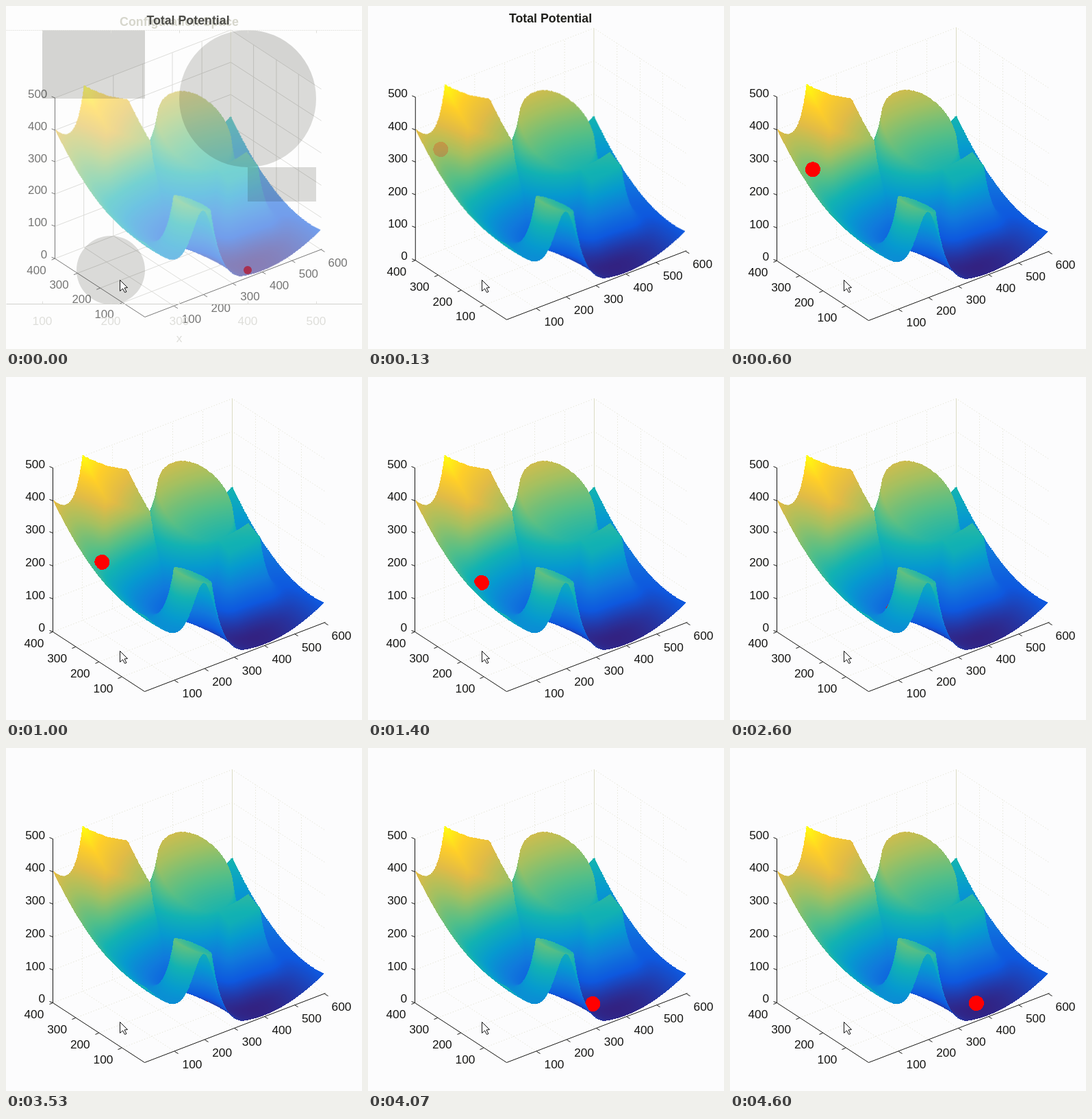
An HTML page with a canvas that plays this animation: 520x500 px, repeating every 4670 ms.

```html
<!DOCTYPE html>
<html lang="en">
<head>
<meta charset="utf-8">
<title>Total Potential</title>
<style>
  html, body { margin: 0; width: 100%; height: 100%; overflow: hidden; background: #fcfcfd; }
  canvas { display: block; }
</style>
</head>
<body>
<canvas id="stage" width="520" height="500"></canvas>
<script>
const start = performance.now();
const W = 520, H = 500, LOOP = 4670, TICK = 200 / 3;
const ctx = document.getElementById('stage').getContext('2d');
const FONT = '"Liberation Sans", Arial, sans-serif';

// Potential field: a quadratic bowl around the goal plus repulsion from four obstacles.
const NX = 600, NY = 400, GOAL = [400, 50], START = [50, 350];
const rects = [[100, 300, 250, 400], [400, 150, 500, 200]];
const discs = [[200, 50, 50], [400, 300, 100]];

function clearance(x, y) {
  const toRects = rects.map(([x0, y0, x1, y1]) =>
    Math.hypot(Math.max(x0 - x, 0, x - x1), Math.max(y0 - y, 0, y - y1)));
  const toDiscs = discs.map(([cx, cy, r]) => Math.max(0, Math.hypot(x - cx, y - cy) - r));
  return Math.min(...toRects, ...toDiscs);
}

function potential(x, y) {
  const attract = ((x - GOAL[0]) ** 2 + (y - GOAL[1]) ** 2) / 700;
  const d = 1 + clearance(x, y) / 100;
  return attract + (d < 2 ? 800 * (1 / d - 0.5) ** 2 : 0);
}

const field = new Float32Array((NX + 1) * (NY + 1));
for (let y = 0; y <= NY; y++)
  for (let x = 0; x <= NX; x++) field[y * (NX + 1) + x] = potential(x, y);
const heightAt = (x, y) => field[Math.round(y) * (NX + 1) + Math.round(x)];

// Orthographic camera: azimuth -37.5 degrees, elevation 30 degrees.
const SCALE = 0.552, OX = 202.1, OY = 458.4;
const AZ = 37.5 * Math.PI / 180, CA = Math.cos(AZ), SA = Math.sin(AZ);
const SE = 0.5, CE = Math.sqrt(3) / 2;
const project = (x, y, z) => [
  OX + SCALE * (x * CA - y * SA),
  OY - SCALE * ((x * SA + y * CA) * SE + z * CE)
];
const depthOf = (h, z) => h * CE - z * SE;

// Evenly spaced colour stops over the height range.
const Z_MAX = 503;
const stops = [
  [50, 34, 130], [14, 88, 222], [16, 122, 220], [6, 154, 207], [18, 178, 178],
  [86, 191, 134], [164, 192, 96], [225, 187, 70], [255, 206, 40], [255, 254, 12]
];
function colorAt(z) {
  const pos = Math.min(0.9999, z / Z_MAX) * (stops.length - 1);
  const i = Math.floor(pos);
  return stops[i].map((c, k) => c + (stops[i + 1][k] - c) * (pos - i));
}
const palette = Array.from({ length: 520 }, (_, z) => colorAt(z));

// Cast one ray per pixel, keeping the colour and the depth of the first crossing.
const depth = new Float32Array(W * H).fill(Infinity);
const surface = document.createElement('canvas');
surface.width = W;
surface.height = H;

function renderSurface() {
  const sctx = surface.getContext('2d');
  const img = sctx.createImageData(W, H);
  const STEP = 1.5;
  for (let py = 100; py < 405; py++) {
    for (let px = 66; px < 470; px++) {
      const u = (px + 0.5 - OX) / SCALE, v = (OY - py - 0.5) / SCALE;
      const near = Math.max(-u * CA / SA, u * SA / CA, (v - 510 * CE) / SE);
      const far = Math.min((NX - u * CA) / SA, (NY + u * SA) / CA);
      let last = null;
      for (let h = near; h <= far; h += STEP) {
        const z = (v - SE * h) / CE;
        const gap = z - heightAt(u * CA + h * SA, h * CA - u * SA);
        if (last !== null && (gap < 0) !== (last < 0)) {
          const hit = h - STEP * gap / (gap - last);
          const hz = (v - SE * hit) / CE;
          const i = py * W + px;
          depth[i] = depthOf(hit, hz);
          img.data.set(palette[Math.max(0, Math.min(519, Math.round(hz)))], i * 4);
          img.data[i * 4 + 3] = 255;
          break;
        }
        if (z < 0) break;
        last = gap;
      }
    }
  }
  sctx.putImageData(img, 0, 0);
}

// Unit steps down the gradient until the goal is close.
function planRoute() {
  const route = [START];
  let [x, y] = START;
  while (Math.hypot(x - GOAL[0], y - GOAL[1]) > 2 && route.length < 1000) {
    const gx = heightAt(x - 1, y) - heightAt(x + 1, y);
    const gy = heightAt(x, y - 1) - heightAt(x, y + 1);
    const n = Math.hypot(gx, gy) || 1;
    x += gx / n;
    y += gy / n;
    route.push([x, y]);
  }
  return route;
}

renderSurface();
const route = planRoute();

function line(color, points, dash = []) {
  ctx.strokeStyle = color;
  ctx.lineWidth = 1;
  ctx.setLineDash(dash);
  ctx.beginPath();
  points.forEach(([x, y]) => ctx.lineTo(Math.round(x) + 0.5, Math.round(y) + 0.5));
  ctx.stroke();
  ctx.setLineDash([]);
}

function label(text, x, y, color, align = 'center', font = '17.3px ') {
  ctx.font = font + FONT;
  ctx.fillStyle = color;
  ctx.textAlign = align;
  ctx.textBaseline = 'middle';
  ctx.fillText(text, x, y);
}
const title = (text, x, y, color) => label(text, x, y, color, 'center', 'bold 17.8px ');

function drawGrid(color, dash) {
  const wire = (...pts) => line(color, pts.map(p => project(...p)), dash);
  for (let z = 0; z <= 500; z += 100) wire([0, NY, z], [NX, NY, z], [NX, 0, z]);
  for (let x = 100; x <= 500; x += 100) wire([x, 0, 0], [x, NY, 0], [x, NY, 500]);
  for (let y = 100; y <= 300; y += 100) wire([0, y, 0], [NX, y, 0], [NX, y, 500]);
  line('#dcdcc4', [project(NX, NY, 0), project(NX, NY, 500)]);
}

function drawAxes() {
  const ink = '#141412';
  const tick = (p, dx, dy) => line(ink, [p, [p[0] + dx, p[1] + dy]]);
  line(ink, [project(0, NY, 500), project(0, NY, 0), project(0, 0, 0), project(NX + 3, 0, 0)]);
  for (let i = 0; i <= 5; i++) {
    tick(project(0, NY, i * 100), -5, -2);
    label(i * 100, 57, 366.5 - 47.7 * i, ink, 'right');
  }
  for (let i = 0; i < 6; i++) {
    tick(project(100 + i * 100, 0, 0), 5, 3);
    label(100 + i * 100, 272 + 43.6 * i, 462.5 - 16.8 * i, ink);
  }
  for (let i = 0; i < 4; i++) {
    tick(project(0, 100 + i * 100, 0), -5, 2);
    label(100 + i * 100, 142 - 33.7 * i, 455 - 21.8 * i, ink);
  }
}

function drawPlot(zoom, gridColor, gridDash) {
  ctx.save();
  ctx.translate((1 - zoom) * 220, (1 - zoom) * 205);
  ctx.scale(zoom, zoom);
  drawGrid(gridColor, gridDash);
  drawAxes();
  ctx.drawImage(surface, 0, 0);
  ctx.restore();
}

function drawBall(progress, alpha) {
  const R = 20, LIFT = 18;
  const [x, y] = route[Math.round(progress * (route.length - 1))];
  const z = heightAt(x, y) + LIFT;
  const [cx, cy] = project(x, y, z);
  const center = depthOf(x * SA + y * CA, z), r = R * SCALE;
  ctx.fillStyle = `rgba(255,0,0,${alpha})`;
  ctx.beginPath();
  for (let py = Math.floor(cy - r); py <= cy + r; py++) {
    for (let px = Math.floor(cx - r); px <= cx + r; px++) {
      const inside = R * R - ((px + 0.5 - cx) ** 2 + (py + 0.5 - cy) ** 2) / SCALE ** 2;
      if (inside > 0 && center - Math.sqrt(inside) < depth[py * W + px]) ctx.rect(px, py, 1, 1);
    }
  }
  ctx.fill();
}

// Flat map of the obstacles, one pixel per unit, blended over the plot.
function drawMap() {
  const mx = x => x - 47, my = y => 435 - y, pale = '#dededa';
  const shapes = new Path2D();
  for (const [x0, y0, x1, y1] of rects) shapes.rect(mx(x0), my(y1), x1 - x0, y1 - y0);
  for (const [x, y, r] of discs) {
    shapes.moveTo(mx(x) + r, my(y));
    shapes.arc(mx(x), my(y), r, 0, 7);
  }
  ctx.save();
  ctx.globalCompositeOperation = 'multiply';
  ctx.fillStyle = '#dcdcda';
  ctx.fill(shapes);
  ctx.clip(shapes);
  ctx.fillStyle = '#f8f8f8';
  ctx.beginPath();
  [[0, 0], [0, 160], [72, 133], [329, 35], [462, 121], [W, 121], [W, 0]]
    .forEach(p => ctx.lineTo(...p));
  ctx.fill();
  ctx.restore();

  line('#e4e4e0', [[0, 35], [W, 35]], [2, 1]);
  line('#d0d0cc', [[0, 434], [W, 434]]);
  for (let x = 100; x <= 500; x += 100) {
    line(pale, [[mx(x), 434], [mx(x), 430]]);
    line(pale, [[mx(x), 35], [mx(x), 39]]);
    label(x, mx(x), 460, pale);
  }
  label('x', 253, 485, pale);
  title('Configuration Space', 253, 24, '#d6d6cc');
  ctx.fillStyle = '#a83050';
  ctx.beginPath();
  ctx.arc(mx(GOAL[0]), my(GOAL[1]), 6, 0, 7);
  ctx.fill();
}

function drawCursor() {
  ctx.beginPath();
  [[0, 0], [0, 16], [4, 12.5], [7, 18], [9.5, 17], [6.5, 11.5], [11, 11]]
    .forEach(([x, y]) => ctx.lineTo(166.5 + x, 399.5 + y));
  ctx.closePath();
  ctx.fillStyle = '#fff';
  ctx.strokeStyle = '#111';
  ctx.lineWidth = 1;
  ctx.fill();
  ctx.stroke();
}

function draw(t) {
  const tick = Math.floor((t + 5) / TICK);
  ctx.fillStyle = '#fcfcfd';
  ctx.fillRect(0, 0, W, H);
  if (tick < 2) {
    drawPlot(0.98, '#c4c4be', []);
    ctx.fillStyle = 'rgba(252,252,253,0.42)';
    ctx.fillRect(0, 0, W, H);
    drawMap();
    title('Total Potential', 266, 22, '#4c4c48');
  } else {
    const fade = Math.min(1, (tick - 1.5) * 0.4);
    drawPlot(tick === 2 ? 0.995 : 1, '#dedecc', [1, 3]);
    if (fade < 1) title('Total Potential', 266.5, 19, `rgba(20,20,16,${Math.min(1, 1.15 - fade)})`);
    drawBall(Math.min(1, Math.max(0, (tick - 3) / 65.5)), fade);
  }
  drawCursor();
}

function loop() {
  draw((performance.now() - start) % LOOP);
  requestAnimationFrame(loop);
}
loop();
</script>
</body>
</html>
```
